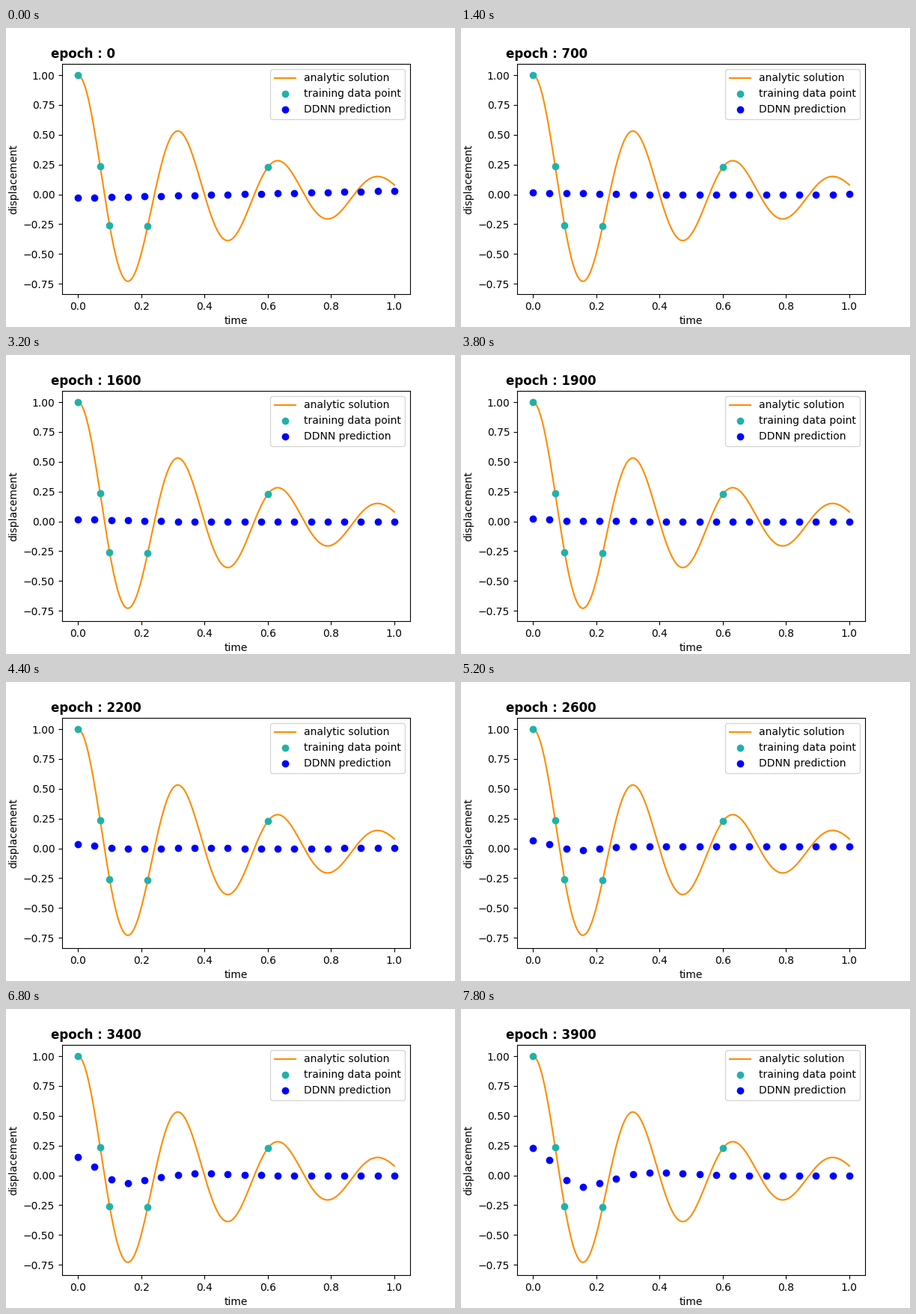
Recreate the animation shown at these times as a matplotlib script. Size 600 by 400 pixels, loop 8 s.

```python
import numpy as np
import matplotlib.pyplot as plt
from matplotlib.animation import FuncAnimation

FRAMES = 40
INTERVAL = 200
EPOCH_STEP = 100
LAST_EPOCH = 3900
WAVE_START = 1600
DAMPING, FREQ = 2.0, 20.0


def oscillator(t):
    """Underdamped motion released from rest at 1."""
    w = np.sqrt(FREQ**2 - DAMPING**2)
    return np.exp(-DAMPING * t) * (np.cos(w * t) + DAMPING / w * np.sin(w * t))


def wave(t):
    """Damped swing that slows down; the phase counts quarter turns."""
    quarters = np.interp(t, [0, 0.05, 0.09, 0.17, 0.3, 0.6, 0.93],
                         [0, 0.45, 1, 2, 3, 5, 7])
    return np.exp(-5.2 * t) * np.cos(quarters * np.pi / 2)


def predict(t, epoch):
    start = -0.028 + 0.058 * t
    p = max(0, (epoch - WAVE_START) / (LAST_EPOCH - WAVE_START))

    # A flat mode gives way to the growing wave; the tail lifts in passing.
    flat = 0.016 * (1 - p) * np.exp(-3 * t) * np.cos(5 * t)
    swing = 0.23 * p**1.6 * wave(t + 0.012 * np.sqrt(1 - p))
    lift = 0.017 * np.exp(-(((epoch - 2600) / 250) ** 2)) * (1 - np.exp(-4 * t))

    k = np.exp(-epoch / 150)
    return k * start + (1 - k) * (flat + swing + lift)


fig, ax = plt.subplots(figsize=(6, 4), dpi=100)
t = np.linspace(0, 1, 500)
t_train = t[[0, 35, 50, 110, 300]]
t_pred = np.linspace(0, 1, 20)

ax.plot(t, oscillator(t), color="darkorange", label="analytic solution")
ax.scatter(t_train, oscillator(t_train), color="lightseagreen", zorder=3,
           label="training data point")
dots = ax.scatter(t_pred, predict(t_pred, 0), color="blue", zorder=4,
                  label="DDNN prediction")
ax.set_xlim(-0.05, 1.05)
ax.set_ylim(-0.837, 1.095)
ax.set_xlabel("time")
ax.set_ylabel("displacement")
ax.legend(loc="upper right", scatteryoffsets=[0.45])
title = fig.text(0.1, 0.9, "", fontsize=12, fontweight="bold")


def update(frame):
    epoch = frame * EPOCH_STEP
    title.set_text(f"epoch : {epoch}")
    dots.set_offsets(np.column_stack([t_pred, predict(t_pred, epoch)]))
    return title, dots


anim = FuncAnimation(fig, update, frames=FRAMES, interval=INTERVAL, repeat=True)
plt.show()
```
